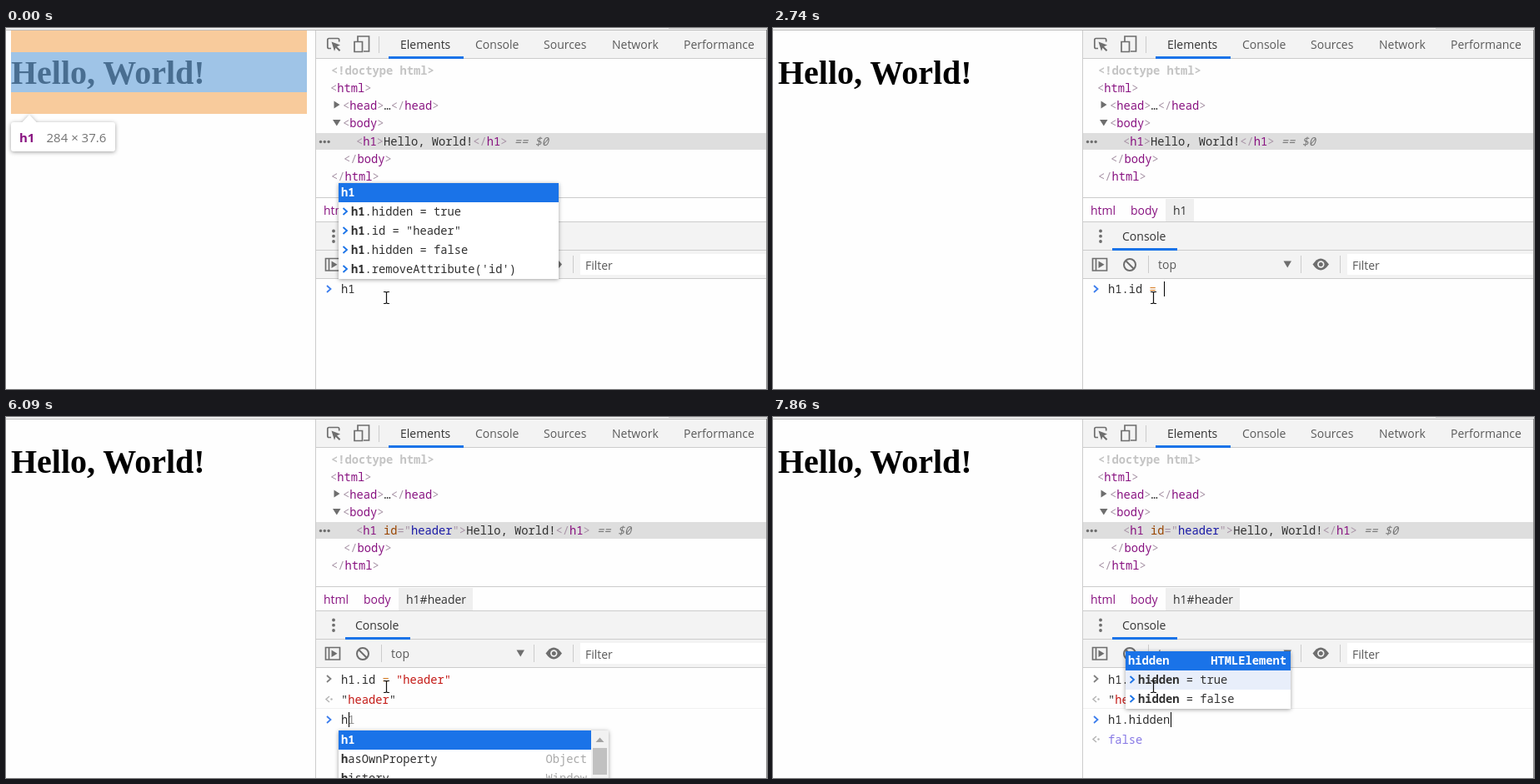
Recreate the animation shown at these times as an HTML page. Size 913 by 433 pixels, loop 8 s.

```html
<!DOCTYPE html>
<html lang="en">
<head>
<meta charset="utf-8">
<title>Console demo</title>
<style>
  html, body { margin: 0; width: 100%; height: 100%; overflow: hidden; background: #fefefe; }
  svg { display: block; }
  text { white-space: pre; }
  .ui { font: 14px "Open Sans", "Noto Sans", sans-serif; fill: #5a5a5a; }
  .tip { font-size: 15px; fill: #737373; }
  .mono { font: 13.75px "Noto Sans Mono", "DejaVu Sans Mono", monospace; fill: #303030; }
  .title { font: bold 40px "Liberation Serif", "Noto Serif", serif; }
  .dark { fill: #333; }
  .br { fill: #a894a6; }
  .tag { fill: #881280; }
  .attr { fill: #994500; }
  .val { fill: #1a1aa6; }
  .str { fill: #c41a16; }
  .num { fill: #1c00cf; }
  .op { fill: #d9822b; }
  .ghost { fill: #8f8f8f; }
  .doc { fill: #c4c4c4; font-weight: bold; }
  .ref { fill: #777; font-style: italic; }
  .b { font-weight: bold; }
  .sel { fill: #fff; font-weight: bold; }
  .kind { fill: #a9a9a9; text-anchor: end; }
  .kind.sel { fill: #fff; }
  .line { fill: #ccc; }
  .bar { fill: #f3f3f3; }
  .blue { fill: #1a73e8; }
  .icon { fill: none; stroke: #6e6e6e; stroke-width: 1.7; }
  .solid { fill: #6e6e6e; }
  .shadow { filter: drop-shadow(0 1px 2.5px rgba(0, 0, 0, .38)); }
</style>
</head>
<body>
<svg width="913" height="433" viewBox="0 0 913 433">
  <rect width="913" height="2" fill="#f1f1f1"/>
  <rect x="795" width="118" height="1" fill="#cfcfcf"/>
  <rect y="2" width="913" height="1" fill="#bcbcbc"/>
  <text class="title" x="6" y="67">Hello, World!</text>

  <!-- tab bar -->
  <rect class="bar" x="372" y="3" width="540" height="33"/>
  <rect class="line" x="372" y="36" width="540" height="1"/>
  <rect class="line" x="447" y="10" width="1" height="20"/>
  <rect class="blue" x="459" y="34" width="90" height="3"/>
  <path class="icon" d="M390 24.5h-2.5q-1.700 0-1.700-1.700v-8.600q0-1.700 1.700-1.700h10.500q1.700 0 1.700 1.700v2.300"/>
  <path class="solid" d="M390.500 16.500l10.500 4-4 1.700 4.300 4.300-1.500 1.500-4.300-4.300-1.500 4z"/>
  <path class="icon" d="M422 16v-6h13.500v18h-6.500M418 16.500h9.500v12h-9.500z"/>
  <g id="tabs"></g>

  <!-- element tree -->
  <rect x="372" y="126" width="540" height="20" fill="#dedede"/>
  <path class="solid" d="M393.500 87.500v9l7-4.500zM392 110h9.500l-4.700 7.500z"/>
  <g class="solid"><circle cx="377.500" cy="136.500" r="1.700"/><circle cx="382.300" cy="136.500" r="1.700"/><circle cx="387.100" cy="136.500" r="1.700"/></g>
  <g id="tree"></g>

  <!-- breadcrumbs, drawer, toolbar -->
  <rect class="line" x="372" y="203" width="540" height="1"/>
  <rect class="bar" x="372" y="233" width="540" height="67"/>
  <rect class="line" x="372" y="232" width="540" height="1"/>
  <rect class="line" x="372" y="266" width="540" height="1"/>
  <rect class="line" x="372" y="300" width="540" height="1"/>
  <rect class="blue" x="407" y="264" width="78" height="3"/>
  <g class="solid"><circle cx="393" cy="243.500" r="1.900"/><circle cx="393" cy="249.700" r="1.900"/><circle cx="393" cy="256" r="1.900"/></g>
  <path class="icon" d="M383.500 276.500h17v14.500h-17zM387.500 276.500v14.500"/>
  <path class="solid" d="M390.500 279.500v8.500l7-4.250z"/>
  <circle class="icon" cx="428" cy="284" r="7" style="stroke-width:2"/>
  <path class="icon" d="M423 279l10 10" style="stroke-width:2"/>
  <path class="solid" d="M612.500 279.500h9.500l-4.750 8z"/>
  <path class="solid" d="M647.500 283.500q9.500-14 19.500 0q-10 14-19.500 0z"/>
  <circle cx="657.300" cy="283.500" r="4.200" fill="#f3f3f3"/>
  <circle class="solid" cx="657.300" cy="283.500" r="2.500"/>
  <g class="line"><rect x="450" y="273" width="1" height="21"/><rect x="633" y="273" width="1" height="21"/><rect x="680" y="273" width="1" height="21"/></g>
  <rect x="689" y="271" width="223" height="25" fill="#fff"/>
  <g id="labels"></g>

  <g id="live"></g>

  <rect class="line" x="371" y="3" width="1" height="430"/>
  <rect x="912" y="2" width="1" height="431" fill="#8c8c8c"/>
  <path d="M453 316.500h2.500l1 1 1-1h2.500M456.500 317v12.500M453 330.500h2.500l1-1 1 1h2.500" fill="none" stroke="#111" stroke-width="1.200"/>
</svg>
<script>
const LOOP = 8000, CHAR = 8.25, LEFT = 402, ROW = 23;
const byId = id => document.getElementById(id);
const esc = s => s.replace(/&/g, '&amp;').replace(/</g, '&lt;');
const span = (s, cls = '', style = '') => `<tspan class="${cls}" style="${style}">${esc(s)}</tspan>`;
const text = (x, y, body, cls = 'mono') => `<text class="${cls}" x="${x}" y="${y}">${body}</text>`;
const rect = (x, y, w, h, fill, more = '') =>
  `<rect x="${x}" y="${y}" width="${w}" height="${h}" fill="${fill}" ${more}/>`;
const ui = (x, y, s, cls = '') => text(x, y, esc(s), 'ui ' + cls);
const tag = (name, close = '') => span('<' + close, 'br') + span(name, 'tag') + span('>', 'br');
const mix = (a, b, p) => `rgb(${a.map((v, i) => Math.round(v + (b[i] - v) * p))})`;

byId('tabs').innerHTML = ui(473, 25, 'Elements', 'dark') + ui(563, 25, 'Console') +
  ui(645, 25, 'Sources') + ui(727, 25, 'Network') + ui(813, 25, 'Performance');
byId('tree').innerHTML = text(390, 56, span('<!doctype html>', 'doc')) + text(389, 77, tag('html')) +
  text(404, 98, tag('head') + '…' + tag('head', '/')) + text(404, 119, tag('body')) +
  text(405, 162, tag('body', '/')) + text(390, 183, tag('html', '/'));
byId('labels').innerHTML = ui(381, 224, 'html', 'tag') + ui(429, 224, 'body', 'tag') +
  ui(419, 255, 'Console', 'dark') + ui(462, 289, 'top') + ui(695, 290, 'Filter');

// Suggestion lists: ">" marks history, *…* the matched part, "|" the owner.
const h1List = (y, first, second, hover) => ({ x: 399, y, w: 264, hover,
  rows: ['*h1*', first, second, '>*h1*.hidden = false', ">*h1*.removeAttribute('id')"] });
const setId = '>*h1*.id = "header"', hide = '>*h1*.hidden = true';
const members = y => ({ x: 423, y, w: 379, scroll: true, rows: ['align|HTMLHeadingElement', 'constructor',
  'accessKey|HTMLElement', 'autocapitalize', 'autofocus'] });
const globals = { x: 399, y: 376, w: 324, scroll: true, rows: ['*h*1', '*h*asOwnProperty|Object', '*h*istory|Window'] };
const idList = { x: 423, y: 140, w: 198, sel: 3, rows: ['h*id*den|HTMLElement', 'offsetW*id*th', 'oninval*id*',
  '*id*|Element', 'clientW*id*th', 'scrollW*id*th', '>*id* = "header"'] };
const valueList = n => ({ x: 465, y: 278, w: 132, sel: -1,
  rows: [`>*${'"header"'.slice(0, n)}*${'"header"'.slice(n)}`] });
const hiList = (n, ...more) => ({ x: 423, y: 376, w: 379, scroll: true,
  rows: [`*${'hidden'.slice(0, n)}*${'hidden'.slice(n)}|HTMLElement`, ...more] });
const hiddenList = n => {
  const word = `*${'hidden'.slice(0, n)}*${'hidden'.slice(n)}`;
  return { x: 423, y: 281, w: 198, hover: 1,
    rows: [word + '|HTMLElement', `>${word} = true`, `>${word} = false`] };
};
const empty = span('""', 'str'), no = span('false', 'num');

// Each step changes only the named parts of the one before.
const steps = [
  [0, { input: 'h1', ghost: '', caret: false, box: true, eager: '', done: false, flash: null, pop: h1List(186, hide, setId) }],
  [270, { caret: true }],
  [840, { caret: false }],
  [1270, { input: 'h1.', caret: true, box: false, pop: null }],
  [1420, { ghost: 'align', pop: members(326) }],
  [1870, { input: 'h1.id', ghost: '', eager: empty, pop: idList }],
  [2440, { input: 'h1.id ', pop: null }],
  [2585, { input: 'h1.id =', eager: '' }],
  [2730, { input: 'h1.id = ' }],
  [2875, { input: 'h1.id = "', pop: valueList(1) }],
  [3020, { input: 'h1.id = "h', pop: valueList(2) }],
  [3450, { input: 'h1.id = "he', pop: valueList(3) }],
  [3600, { input: 'h1.id = "head', pop: valueList(5) }],
  [4060, { input: 'h1.id = "header', pop: valueList(7) }],
  [4340, { input: 'h1.id = "header"', pop: null }],
  [4770, { caret: false }],
  [4920, { input: '', caret: true, done: true, flash: .02 }],
  [5060, { flash: .15 }],
  [5200, { flash: .41 }],
  [5350, { flash: .65 }],
  [5500, { flash: .82, caret: false }],
  [5780, { flash: .96 }],
  [6090, { input: 'h', ghost: '1', caret: true, flash: null, pop: globals }],
  [6250, { input: 'h1', ghost: '', pop: h1List(235, setId, hide, 3) }],
  [6400, { box: true, eager: span('h1', 'tag') + span('#header', 'val') }],
  [6830, { input: 'h1.', box: false, eager: '', pop: null }],
  [6970, { ghost: 'align', pop: members(376) }],
  [7100, { eager: empty }],
  [7250, { input: 'h1.h', ghost: 'idden', eager: no, pop: hiList(1, '*h*asAttribute|Element', '*h*asAttributes') }],
  [7400, { input: 'h1.hi', ghost: 'dden', pop: hiList(2, 'c*hi*ldNodes|Node', 'c*hi*ldren|Element') }],
  [7550, { input: 'h1.hid', ghost: 'den', pop: hiddenList(3) }],
  [7700, { input: 'h1.hidde', ghost: 'n', pop: hiddenList(5) }],
  [7860, { input: 'h1.hidden', ghost: '', pop: hiddenList(6) }]
];
let carry = {};
const states = steps.map(([, change]) => carry = { ...carry, ...change });

const chevron = (x, y, color) =>
  `<path d="M${x} ${y - 4}l4.500 4-4.500 4" fill="none" stroke="${color}" stroke-width="1.800"/>`;
const reply = y => `<path d="M388 ${y - 3.5}l-4 3.500 4 3.500" fill="none" stroke="#b5b5b5" stroke-width="1.500"/>` +
  `<circle cx="390.500" cy="${y}" r="1.200" fill="#b5b5b5"/>`;
const paint = s => s.split(/(=|"[^"]*"?)/)
  .map(p => span(p, p === '=' ? 'op' : p[0] === '"' ? 'str' : '')).join('');

function highlight(done) {
  const orange = 'rgba(246,178,107,.66)', w = done ? 186 : 125;
  const name = span('h1', 'tag b') + (done ? span('#header', 'val b') : '');
  return rect(6, 3, 355, 26, orange) + rect(6, 29, 355, 48, 'rgba(111,168,220,.66)') +
    rect(6, 77, 355, 26, orange) +
    `<g class="shadow"><path d="M18.500 114l9.500-10 9.500 10z" fill="#fff"/>` +
    rect(6, 113, w, 35, '#fff', 'rx="3"') + '</g>' +
    text(16, 137, name, 'ui tip') + ui(done ? 109.5 : 48.5, 137, '284 × 37.6', 'tip');
}

function heading({ done, flash }) {
  const lit = flash !== null;
  const ink = lit ? `fill:${mix([255, 255, 255], [168, 148, 166], flash)}` : '';
  const attr = done ? ' ' + span('id', 'attr') + span('="', 'br') + span('header', 'val', ink) + span('"', 'br') : '';
  return (lit ? rect(486, 127, 49, 18, mix([158, 54, 153], [245, 219, 244], flash), 'rx="2"') : '') +
    text(420, 141, span('<', 'br') + span('h1', 'tag') + attr + span('>', 'br') +
      'Hello, World!' + tag('h1', '/') + span(' == $0', 'ref'));
}

function consoleRows(s) {
  const y = s.done ? 363 : 313;
  let out = '';
  if (s.done) {
    out += chevron(385, 314, '#808080') + text(LEFT, 320, paint('h1.id = "header"')) +
      reply(338.5) + text(LEFT, 344, '"' + span('header', 'str') + '"') +
      rect(372, 349, 540, 1, '#f0f0f0');
  }
  out += chevron(385, y, '#3b7ded') + text(LEFT, y + 5, paint(s.input) + span(s.ghost, 'ghost'));
  if (s.caret) out += rect(Math.round(LEFT + .5 + CHAR * s.input.length), y - 9, 1, 18, '#000');
  if (s.eager) out += reply(y + 23.5) + `<g opacity=".52">${text(LEFT, y + 28.5, s.eager)}</g>`;
  return out;
}

function popup({ x, y, w, rows, sel = 0, hover, scroll }) {
  const h = rows.length * ROW, inner = scroll ? w - 21 : w;
  let out = `<g class="shadow">${rect(x, y, w, h, '#fff')}</g>`;
  rows.forEach((row, i) => {
    const top = y + i * ROW, on = i === sel, past = row[0] === '>';
    const [label, kind] = row.slice(past ? 1 : 0).split('|');
    const body = label.split('*').map((p, k) => span(p, on ? 'sel' : k % 2 ? 'b' : '')).join('');
    if (on || i === hover) out += rect(x, top, inner, ROW, on ? '#1a73e8' : '#e8eefa');
    if (past) out += chevron(x + 5.5, top + 11, '#1a73e8');
    out += text(x + (past ? 15 : 3), top + 16, body);
    if (kind) out += text(x + inner - 5, top + 16, esc(kind), 'mono kind' + (on ? ' sel' : ''));
  });
  if (scroll) {
    out += rect(x + w - 21, y, 21, h, '#f1f1f1') + rect(x + w - 19, y + 21, 17, 32, '#c1c1c1') +
      `<path d="M${x + w - 15.5} ${y + 14}h10l-5-5.500z" fill="#a3a3a3"/>`;
  }
  return out;
}

const draw = s => (s.box ? highlight(s.done) : '') + heading(s) +
  rect(471, 205, s.done ? 89 : 34, 27, '#efefef') + ui(480, 224, s.done ? 'h1#header' : 'h1', 'dark') +
  consoleRows(s) + (s.pop ? popup(s.pop) : '');

const start = performance.now();
let shown = -1;
function tick() {
  const t = (performance.now() - start) % LOOP;
  const i = steps.findLastIndex(([at]) => at <= t);
  if (i !== shown) byId('live').innerHTML = draw(states[shown = i]);
  requestAnimationFrame(tick);
}
tick();
</script>
</body>
</html>
```
